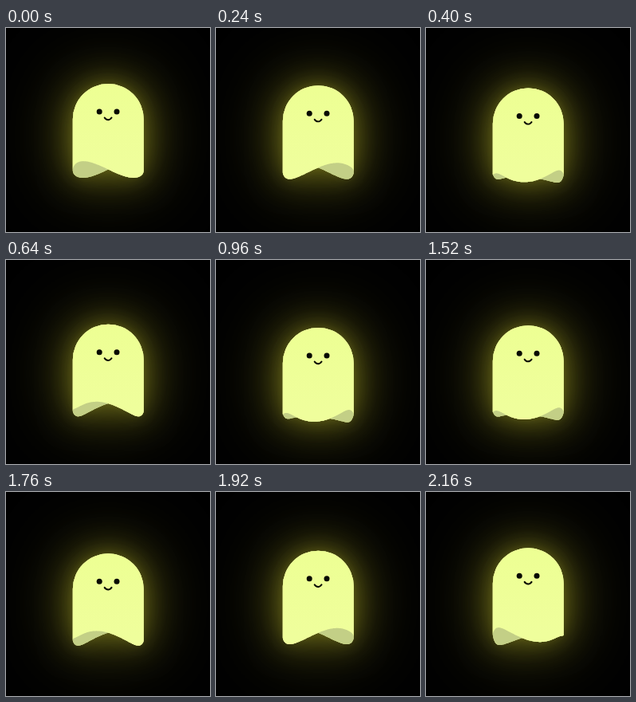
An HTML page with a canvas for the animation above (2.24 s loop, 256x256 px).

```html
<!DOCTYPE html>
<html lang="en">
<head>
<meta charset="utf-8">
<title>Glowing ghost</title>
<style>
  html, body { margin: 0; width: 100%; height: 100%; overflow: hidden; background: #000; }
  canvas { display: block; width: 100vw; height: 100vh; }
</style>
</head>
<body>
<canvas id="stage" width="256" height="256"></canvas>
<script>
const ctx = document.getElementById('stage').getContext('2d');
const LOOP = 2240, STEP = 80, HEM_LOOP = 560;
const CX = 128.3, R = 44.5, HEM = 107.5, WAVE = 10.4, LIFT = 20;
const TAU = Math.PI * 2;

// Height of the head's top: a bob that lingers at the bottom.
function bob(t) {
  const a = TAU * t / LOOP;
  return 78.4 - 7.75 * Math.cos(a) - 0.66 * Math.cos(2 * a);
}

// The hem is a wave travelling around a cylinder whose two sides stay level.
function hem(t, top) {
  const dip = Math.PI / 4 + Math.PI * t / HEM_LOOP;
  const rise = Math.cos(2 * dip);
  const lift = LIFT * Math.sqrt(Math.max(0, rise - 1e-6));
  const side = a => Math.sin(a) ** 10;
  const base = a => top + HEM + (WAVE * rise + 1) * side(a);
  const front = a => base(a) + WAVE * Math.cos(2 * (a - dip));
  const back = a => base(a) + WAVE * Math.cos(2 * (a + dip))
    + lift * (1.4 * Math.sin(a) ** 2 - 0.3) * (1 - side(a));
  return { front, back, outer: a => Math.max(front(a), back(a)) };
}

function sheet(top, edge) {
  const p = new Path2D();
  p.arc(CX, top + R, R, Math.PI, TAU);
  for (let i = 60; i >= -60; i--) {
    const a = i / 120 * Math.PI;
    p.lineTo(CX + R * Math.sin(a), edge(a));
  }
  p.closePath();
  return p;
}

function glow(path, blur, color) {
  ctx.shadowBlur = blur;
  ctx.shadowColor = color;
  ctx.fill(path);
  ctx.shadowColor = 'transparent';
}

function face(top) {
  const y = top + 35;
  ctx.fillStyle = ctx.strokeStyle = '#080a02';
  for (const x of [117.2, 139]) {
    ctx.beginPath();
    ctx.arc(x, y, 3.5, 0, TAU);
    ctx.fill();
  }
  ctx.lineWidth = 2.1;
  ctx.lineCap = 'round';
  ctx.beginPath();
  ctx.arc(128.1, y + 5, 5.1, Math.PI * 0.17, Math.PI * 0.83);
  ctx.stroke();
}

function draw(t) {
  const top = bob(t);
  const { front, outer } = hem(t, top);
  ctx.fillStyle = '#000';
  ctx.fillRect(0, 0, 256, 256);

  const shape = sheet(top, outer);
  ctx.fillStyle = '#c3cf86';
  glow(shape, 90, 'rgba(186, 182, 34, 0.5)');
  glow(shape, 40, 'rgba(180, 178, 36, 0.5)');
  glow(shape, 12, 'rgba(190, 192, 56, 0.12)');

  const skin = ctx.createLinearGradient(0, top, 0, top + HEM);
  skin.addColorStop(0, '#edff93');
  skin.addColorStop(1, '#effe9c');
  ctx.fillStyle = skin;
  ctx.fill(sheet(top, front));
  face(top);
}

const start = performance.now();
function tick() {
  const t = (performance.now() - start) % LOOP;
  draw(Math.floor(t / STEP) * STEP);
  requestAnimationFrame(tick);
}
tick();
</script>
</body>
</html>
```
